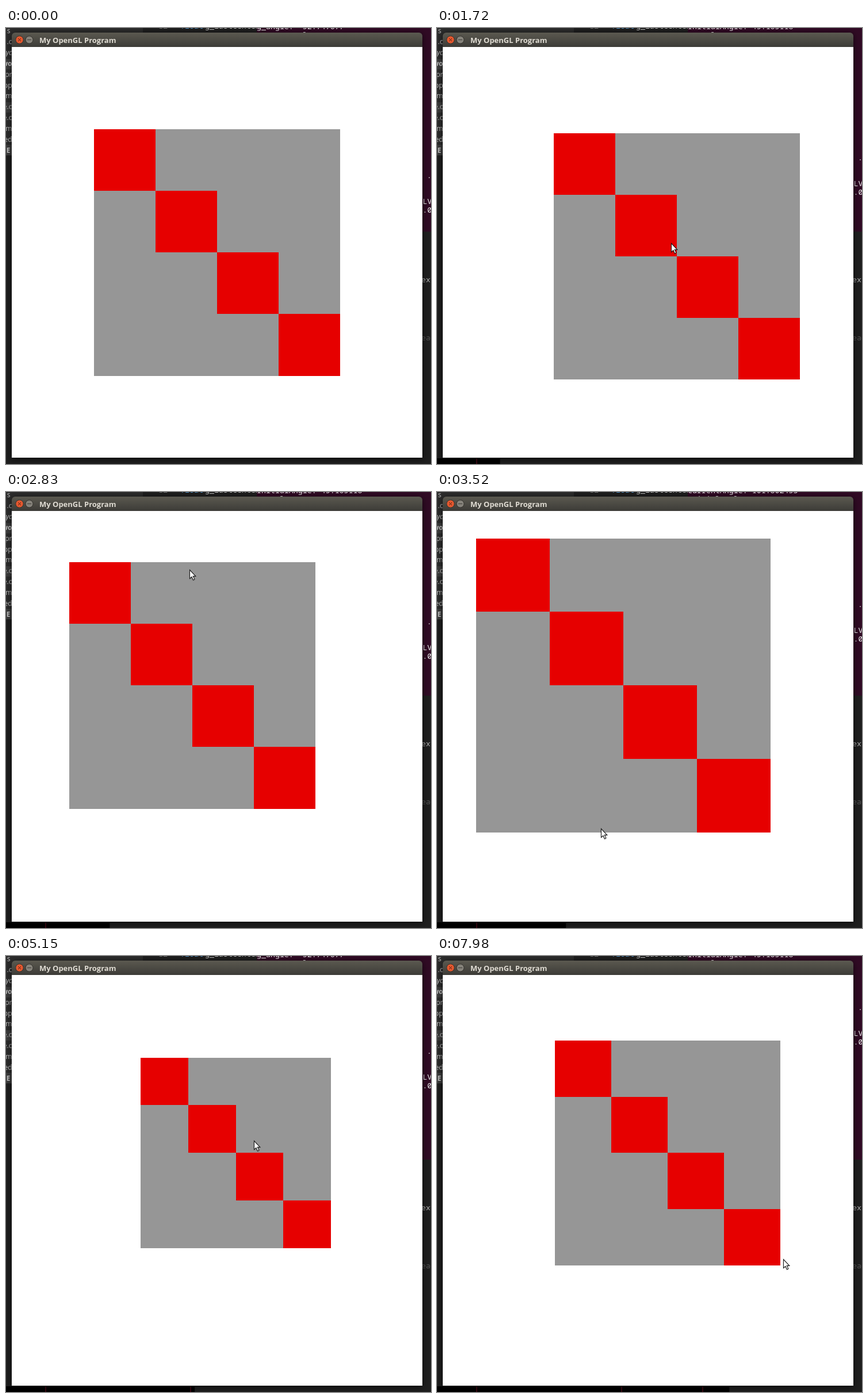
Recreate the animation shown at these times as an HTML page with a canvas. Size 739 px wide and 758 px high, loop 8 s.

```html
<!DOCTYPE html>
<html lang="en">
<head>
<meta charset="utf-8">
<title>My OpenGL Program</title>
<style>
  html, body { margin: 0; width: 100%; height: 100%; overflow: hidden; background: #1e1e1e; }
  canvas { display: block; }
</style>
</head>
<body>
<canvas id="stage" width="739" height="758"></canvas>
<script>
const ctx = document.getElementById('stage').getContext('2d');
const LOOP = 8000;
const MONO = '13.3px "Noto Sans Mono", monospace';
const SANS = '12px "Open Sans", sans-serif';

// The pointer eases from stop to stop; a stop with a pivot is reached by circling it.
const stops = [
  { t: 0, x: 662, y: 775 },
  { t: 1150, x: 358, y: 367, press: 'move' },
  { t: 1720, x: 408, y: 374 },
  { t: 2400, x: 315, y: 313, release: true },
  { t: 2830, x: 320, y: 135 },
  { t: 2950, x: 281, y: 130, press: 'zoom' },
  { t: 4180, x: 487, y: 338, release: true, pivot: { x: 324, y: 336 } },
  { t: 4930, x: 356, y: 315, press: 'move' },
  { t: 5170, x: 433, y: 321, release: true },
  { t: 5900, x: 645, y: 325 },
  { t: 6450, x: 632, y: 588 },
  { t: 7230, x: 560, y: 346 },
  { t: 7380, x: 590, y: 477, press: 'zoom' },
  { t: 7520, x: 612, y: 585 },
  { t: LOOP, x: 603, y: 527, release: true }
];

const logLines = ['g_angle: -52.747677', 'CurrentAngle: 101.802453', 'InitialAngle: 45.165118'];
const prints = [
  { t: 1180, lines: 2 }, { t: 2970, lines: 2 }, { t: 5060, lines: 2 },
  { t: 6300, lines: 3 }, { t: 7400, lines: 2 }
];

const mix = (a, b, u) => a + (b - a) * u;
const smooth = u => u * u * (3 - 2 * u);
const distance = (p, q) => Math.hypot(p.x - q.x, p.y - q.y);
const angle = (p, q) => Math.atan2(p.y - q.y, p.x - q.x);

function circle(a, b, pivot, u) {
  const turn = mix(angle(a, pivot), angle(b, pivot) - 2 * Math.PI, 1 - (1 - u) ** 1.55);
  const swell = 119 * Math.sin(Math.PI * u ** 2.24);
  const radius = mix(distance(a, pivot), distance(b, pivot), u) + swell;
  return { x: pivot.x + radius * Math.cos(turn), y: pivot.y + radius * Math.sin(turn) };
}

function pointerAt(t) {
  const next = Math.max(1, stops.findIndex(stop => stop.t >= t));
  const a = stops[next - 1], b = stops[next];
  const u = (t - a.t) / (b.t - a.t);
  if (b.pivot) return circle(a, b, b.pivot, u);
  return { x: mix(a.x, b.x, smooth(u)), y: mix(a.y, b.y, smooth(u)) };
}

function boardAt(t) {
  const board = { x: 367, y: 390.3, half: 214.2 };
  stops.forEach((start, i) => {
    if (!start.press || t < start.t) return;
    const end = stops.slice(i).find(stop => stop.release);
    const now = pointerAt(Math.min(t, end.t));
    if (start.press === 'move') {
      board.x += now.x - start.x;
      board.y += now.y - start.y;
    } else {
      board.half *= distance(now, board) / distance(start, board);
    }
  });
  return board;
}

function rect(x, y, w, h, color) {
  ctx.fillStyle = color;
  ctx.fillRect(x, y, w, h);
}

function text(str, x, y, color, font = MONO, align = 'left') {
  ctx.font = font;
  ctx.textAlign = align;
  ctx.fillStyle = color;
  ctx.fillText(str, x, y);
}

function disc(x, y, r, fill, edge) {
  ctx.beginPath();
  ctx.arc(x, y, r, 0, 7);
  ctx.fillStyle = fill;
  ctx.fill();
  ctx.strokeStyle = edge;
  ctx.lineWidth = 1;
  ctx.stroke();
}

function line(x1, y1, x2, y2) {
  ctx.beginPath();
  ctx.moveTo(x1, y1);
  ctx.lineTo(x2, y2);
  ctx.stroke();
}

function drawEditor() {
  rect(0, 0, 739, 758, '#1e1e1e');
  rect(0, 0, 238, 222, '#2c2c2c');
  for (const y of [54, 129, 203]) rect(0, y, 10, 18, '#3c3c3c');
  's |.c|eyc|wo|opr|pp|Sm|e.c|e.c|om|ed|E '.split('|').forEach((name, i) => {
    const style = /wo|E/.test(name) ? 'bold ' : name === 'eyc' ? 'italic ' : '';
    text(name, 10.5, 9 + i * 18.9, '#c4c4c4', style + SANS, 'right');
  });
  text('12', 265, 1, '#777');
  text('float', 303, 1, '#569cd6');
  text('g_lastCenter', 346, 1, '#c8c8c8');
  text('ext', 722, 442, '#b0b0b0');
  text('ead', 722, 543, '#555');
}

function drawTerminal(t) {
  rect(436, 0, 303, 354, '#300a24');
  const printed = prints.reduce((sum, p) => sum + (t >= p.t ? p.lines : 0), 0);
  for (const row of [0, 1]) text(logLines[(printed + row) % 3], 436, 2 + 15 * row, '#eee');
  const base = 305.5 - printed * 15.15;
  text('.', 732, base - 45, '#eee');
  text('LV', 724.5, base, '#eee');
  text('.0', 724.5, base + 15, '#eee');
}

function drawProgress(t) {
  const width = t * 0.0637;
  rect(0, 748, width, 10, '#000');
  for (const x of [68, 320, 461]) if (x < width) rect(x, 748, 2, 10, '#3a0611');
}

function drawWindow() {
  ctx.save();
  ctx.shadowColor = 'rgba(0,0,0,.65)';
  ctx.shadowBlur = 12;
  ctx.shadowOffsetY = 2;
  const bar = ctx.createLinearGradient(0, 8, 0, 33);
  bar.addColorStop(0, '#5b5950');
  bar.addColorStop(1, '#3c3b37');
  ctx.fillStyle = bar;
  ctx.beginPath();
  ctx.roundRect(10, 8, 714, 739, [6, 6, 0, 0]);
  ctx.fill();
  ctx.restore();
  rect(10, 33, 714, 714, '#fff');

  disc(23.5, 20.5, 6.7, '#e5582f', '#35332e');
  disc(40.5, 20.5, 6.5, '#85827a', '#35332e');
  ctx.strokeStyle = '#4a2013';
  line(21, 18, 26, 23);
  line(26, 18, 21, 23);
  ctx.strokeStyle = '#3c3b37';
  line(37, 20.5, 44, 20.5);
  text('My OpenGL Program', 58, 25.5, '#dfdbd2', 'bold 13px "Open Sans", sans-serif');
}

function drawBoard({ x, y, half }) {
  const edge = (center, k) => Math.round(center + (k / 2 - 1) * half);
  const box = (from, to, color) => {
    const left = edge(x, from), top = edge(y, from);
    rect(left, top, edge(x, to) - left, edge(y, to) - top, color);
  };
  box(0, 4, '#969696');
  for (let k = 0; k < 4; k++) box(k, k + 1, '#e60000');
}

function drawPointer({ x, y }) {
  ctx.save();
  ctx.translate(Math.round(x) - .5, Math.round(y) + .5);
  ctx.shadowColor = 'rgba(0,0,0,.3)';
  ctx.shadowBlur = 2;
  ctx.shadowOffsetY = 1;
  const arrow = new Path2D('M0 0V15L3.4 11.9L6 17.4L8.4 16.3L5.8 10.9H10.3Z');
  ctx.fillStyle = '#fff';
  ctx.fill(arrow);
  ctx.shadowColor = 'transparent';
  ctx.strokeStyle = '#1c1c1c';
  ctx.lineWidth = 1.1;
  ctx.stroke(arrow);
  ctx.restore();
}

function frame() {
  const t = performance.now() % LOOP;
  drawEditor();
  drawTerminal(t);
  drawProgress(t);
  drawWindow();
  drawBoard(boardAt(t));
  drawPointer(pointerAt(t));
  requestAnimationFrame(frame);
}
frame();
</script>
</body>
</html>
```
